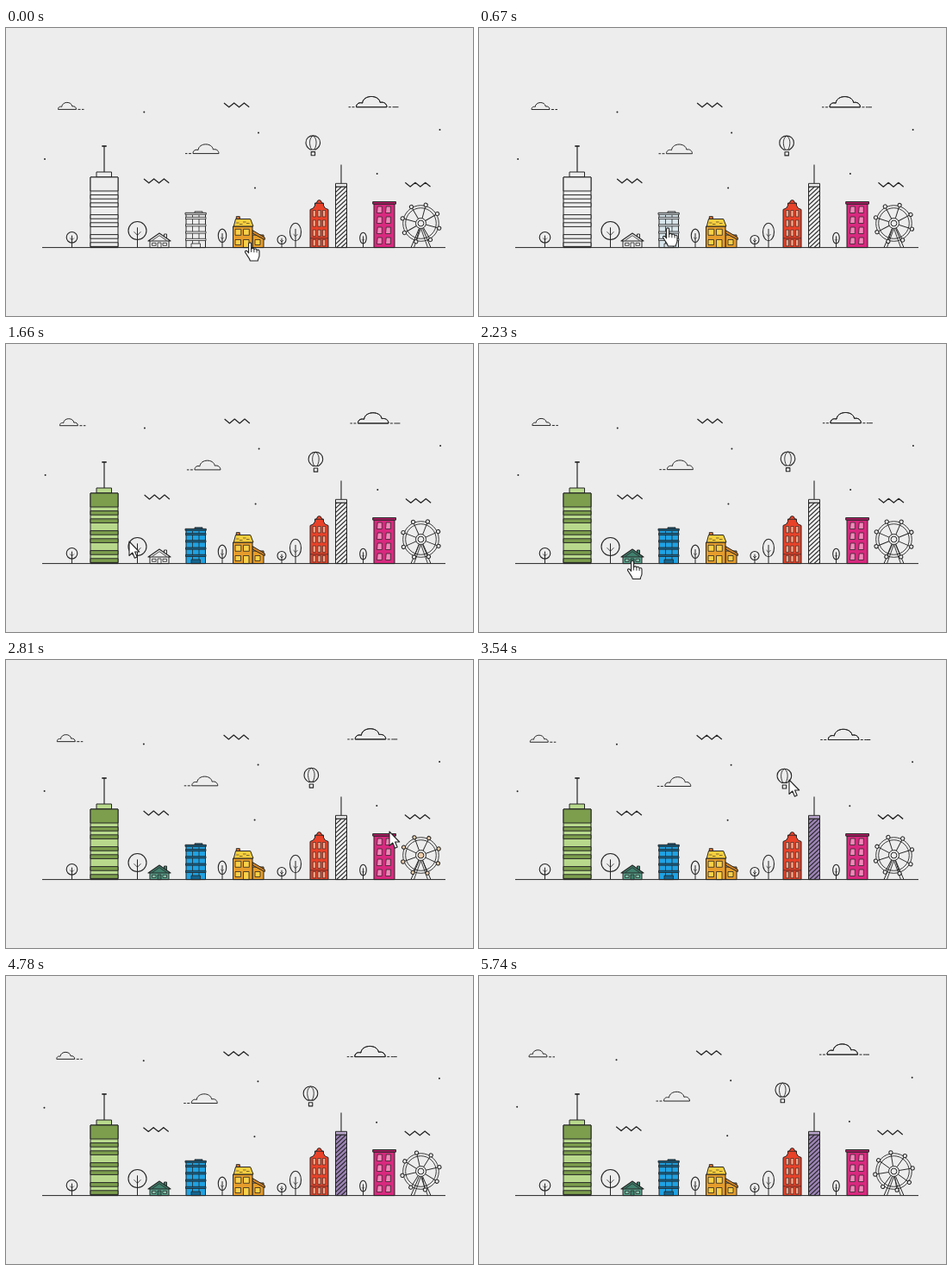
Animation of 542 by 334 pixels, one loop 5840 ms. Source, as an HTML page with a canvas:

```html
<!DOCTYPE html>
<html lang="en">
<head>
<meta charset="utf-8">
<title>City skyline</title>
<style>
html, body { margin: 0; width: 100%; height: 100%; overflow: hidden; background: #ededed; }
canvas { display: block; width: 542px; height: 334px; }
</style>
</head>
<body>
<canvas id="stage"></canvas>
<script>
const W = 542, H = 334, LOOP = 5840, STEP = 140;
const BG = '#ededed', INK = '#252525', GROUND = 254.6;
const TRAVEL = 310, FADE = 290, LAG = 500, EXIT = 4600;
const canvas = document.getElementById('stage');
const ctx = canvas.getContext('2d');
const dpr = window.devicePixelRatio || 1;
canvas.width = W * dpr;
canvas.height = H * dpr;

// Pointer stops: arrival time, x, y. The last one lies past its exit.
const stops = [
  [0, 283, 249.5], [560, 219, 232.5], [1240, 119, 221], [1680, 143, 229], [2000, 178, 252],
  [2620, 482, 226], [2800, 445, 199], [3080, 389, 192], [3500, 360, 139], [4300, 424, 74], [5300, 485, 300]
];

// Hover area (left, right, top), drawing, and when the colour starts to fade in.
const buildings = [
  { area: [98, 130, 173], draw: greenTower, lit: 1200 },
  { area: [166, 190, 238], draw: cottage, lit: 1940 },
  { area: [208, 232, 213], draw: blueBlock, lit: 670 },
  { area: [263, 300, 220], draw: yellowHouse, lit: -FADE },
  { area: [353, 374, 202], draw: redHouse, lit: -FADE },
  { area: [382, 396, 180], draw: purpleTower, lit: 3040 },
  { area: [426, 452, 202], draw: pinkHouse, lit: -FADE },
  { area: [462, 502, 206], draw: wheel, lit: 2480, off: 2680 }
];

const clamp = v => Math.max(0, Math.min(1, v));
const ramp = (t, start, span) => clamp((t - start) / span);
const smooth = p => p * p * (3 - 2 * p);
const mix = (a, b, p) => a + (b - a) * p;

function pointer(t) {
  let [last, x, y] = stops[0];
  for (const [time, sx, sy] of stops.slice(1)) {
    const start = Math.max(last, time - TRAVEL);
    const p = smooth(ramp(t, start, time - start));
    x = mix(x, sx, p);
    y = mix(y, sy, p);
    last = time;
  }
  return [x, y];
}

// The sky shifts against the pointer's recent average position.
function parallax(t) {
  const n = 20;
  let dx = 0, dy = 0;
  for (let i = 0; i < n; i++) {
    const [x, y] = pointer(t - LAG * i / n);
    dx += (283 - x) * .02 / n;
    dy += (250 - y) * .018 / n;
  }
  return [dx, dy];
}

// Fills fade in over the plain background colour.
function paint(path, fill, alpha = 1, width = 1) {
  if (fill) {
    ctx.fillStyle = BG;
    if (alpha < 1) ctx.fill(path);
    ctx.globalAlpha = alpha;
    ctx.fillStyle = fill;
    ctx.fill(path);
    ctx.globalAlpha = 1;
  }
  if (width) {
    ctx.lineWidth = width;
    ctx.stroke(path);
  }
}

const shape = (d, fill, alpha, width) => paint(new Path2D(d), fill, alpha, width);
const line = (x0, y0, x1, y1, width) => shape(`M${x0} ${y0}L${x1} ${y1}`, null, 1, width);

function box(x, y, w, h, fill, alpha, width) {
  const p = new Path2D();
  p.rect(x, y, w, h);
  paint(p, fill, alpha, width);
}

function oval(x, y, rx, ry = rx, fill, alpha, width) {
  const p = new Path2D();
  p.ellipse(x, y, rx, ry, 0, 0, 7);
  paint(p, fill, alpha, width);
}

function at(x, y, draw) {
  ctx.save();
  ctx.translate(x, y);
  draw();
  ctx.restore();
}

function tree(x, y, rx, ry = rx) {
  const s = rx * .38, fork = y + ry * .5;
  oval(x, y, rx, ry, null, 1, 1.1);
  line(x, y - ry * .35, x, GROUND);
  shape(`M${x - s} ${fork - s}L${x} ${fork}L${x + s} ${fork - s}`, null, 1, .8);
}

function greenTower(a) {
  const dark = '#7c9e4d', light = '#b8d98c', band = 4.6;
  line(114, 137, 114, 167, 1.2);
  line(111.3, 137, 116.7, 137, 1.7);
  box(105, 167, 17.5, 6, light, a);
  box(98, 173, 32, GROUND - 173, light, a);
  box(98, 173, 32, 16, dark, a);
  for (let i = 0; i < 6; i++) {
    const y = 189 + band * (1 + 2 * i + (i >> 1));
    box(98, y, 32, band, dark, a);
  }
}

function cottage(a) {
  const roof = '#40806d', glass = '#8bc9b3';
  box(167, 246.5, 22, GROUND - 246.5, '#5ba58e', a);
  box(183.5, 239, 3, 5, roof, a, .9);
  shape('M165 247L178 238L191 247Z', roof, a, 1.1);
  shape('M169.5 246.5L178 240.7L186.5 246.5', null, 1, .8);
  for (const x of [169.5, 182]) box(x, 249.3, 4.5, 3, glass, a, .8);
  box(176, 249, 4, GROUND - 249, roof, a, .8);
}

function blueBlock(a) {
  const slab = '#14658f';
  box(209, 215, 22.5, GROUND - 215, '#1fa2e3', a);
  for (const x of [216.5, 224]) line(x, 217, x, 250, .8);
  for (let i = 0; i < 4; i++) box(208.5, 219.4 + i * 8.3, 23.5, 2.2, slab, a, .8);
  box(219, 212.8, 9, 1.6, slab, a, .8);
  box(208, 214.3, 24.3, 2, slab, a, .9);
  box(215, 250, 10.5, GROUND - 250, slab, a, .8);
}

function yellowHouse() {
  const wall = '#e69d2b', glass = '#fbd04a';
  box(267.3, 218.7, 4, 3, '#e5752c');
  box(286, 240, 13, GROUND - 240, wall);
  shape('M286 234.5L300.3 243V245.5L286 238Z', '#d98725');
  box(263.5, 230, 22.5, GROUND - 230, wall);
  shape('M266.5 221.5H283.7L287 230H264.3Z', '#f8cf3e');
  for (let i = 0; i < 4; i++) line(267 + i * 4, 226 + i % 2 * 2 - i / 2, 270.5 + i * 4, 226 + i % 2 * 2 - i / 2, .6);
  for (const x of [266, 275.5]) {
    box(x, 233.3, 6.8, 7, glass, 1, .8);
    box(x, 245.5, 6.5, x > 270 ? GROUND - 245.5 : 6, glass, 1, .8);
  }
  box(289, 245.5, 6, 6, glass, 1, .8);
}

function redHouse() {
  shape(`M353 ${GROUND}V210.5L356.5 209L358.5 206V203H360.5Q361 199.5 363.5 199.5Q366 199.5 366.5 203H368.5V206L370.5 209L374 210.5V${GROUND}Z`, '#e84229');
  line(359, 203.3, 368, 203.3, .8);
  for (let row = 0; row < 4; row++) {
    for (let col = 0; col < 3; col++) {
      box(356.2 + col * 5.7, 211.5 + row * 11.3, 3.2, 7.4, '#f8a98c', 1, .65);
    }
  }
  line(353, 243.8, 374, 243.8, .7);
}

function purpleTower(a) {
  const body = new Path2D();
  body.rect(382.5, 184, 13, GROUND - 184);
  paint(body, '#9b82b4', a, 0);
  ctx.save();
  ctx.clip(body);
  for (let y = 186; y < 272; y += 5) line(381, y + 1, 397, y - 14, 1.1);
  ctx.restore();
  paint(body);
  line(389, 158.5, 389, 180, 1.1);
  box(382.5, 180.3, 13, 3.7, '#b9a5cb', a);
}

function pinkHouse() {
  box(427, 204, 24, GROUND - 204, '#d8297f');
  box(425.7, 201.5, 26.8, 2.6, '#b81d69');
  for (let y = 207; y < GROUND - 8; y += 12) {
    for (const x of [430.5, 440.5]) {
      shape(`M${x} ${y + 7.5}L${x + .8} ${y}H${x + 5.8}V${y + 7.5}Z`, '#f487b9', 1, .75);
    }
  }
}

function wheel(a, t) {
  const gold = '#f5b97d', r = 22;
  at(481.5, 226.5, () => {
    for (const side of [-1, 1]) {
      line(side * 2, 6, side * 11.5, GROUND - 226.5);
      line(0, 6, side * 8, GROUND - 226.5, .9);
    }
    for (const rim of [20.8, 17.8]) oval(0, 0, rim, rim, null, 1, .9);
    ctx.save();
    ctx.rotate((15 + t * .0036) * Math.PI / 180);
    for (let i = 0; i < 8; i++) {
      line(6, 0, r, 0, .9);
      oval(r, 0, 2.1, 2.1, gold, a);
      ctx.rotate(Math.PI / 4);
    }
    ctx.restore();
    oval(0, 0, 6, 6, BG);
    oval(0, 0, 3.4, 3.4, gold, a);
  });
}

// Two shoulders and a dome on a base line, with two dashes to one side.
function cloud(x, y, w, h, side) {
  const puff = new Path2D('M0 0C0 -.38 .12 -.46 .2 -.38C.23 -1.2 .74 -1.2 .78 -.44C.91 -.52 1 -.3 1 0Z');
  const path = new Path2D();
  path.addPath(puff, new DOMMatrix([w, 0, 0, h, x, y]));
  paint(path);
  const edge = side < 0 ? x : x + w;
  line(edge + side * 2, y, edge + side * 5, y);
  line(edge + side * 6.5, y, edge + side * 9, y);
}

function wave(x, y) {
  let d = `M${x} ${y}`;
  for (let i = 1; i <= 5; i++) d += `L${x + i * 5.85} ${y + i % 2 * 4.8}`;
  shape(d, null, 1, 1.3);
}

function balloon() {
  shape('M353.2 141C350 139 348 136.5 348 133C348 122.2 364.6 122.2 364.6 133C364.6 136.5 362.5 139 359.4 141Z', null, 1, 1.1);
  shape('M354.6 141C351 134 352.4 127 356.3 125C360.2 127 361.6 134 358 141', null, 1, .9);
  box(354.2, 143.6, 4.4, 4.1, null, 1, 1.1);
}

function sky(dx, dy) {
  const layer = (depth, draw) => at(dx * depth, dy * depth, draw);
  layer(.2, () => {
    wave(253, 87);
    wave(160, 175);
    wave(463.3, 179.3);
    for (const [x, y] of [[160.3, 97.5], [45, 152], [293, 121.5], [289, 185.5], [430.7, 169], [503.5, 118]]) {
      oval(x, y, 1, 1, INK, 1, 0);
    }
  });
  layer(.62, () => {
    cloud(60.5, 94.4, 21, 8, 1);
    cloud(217, 145.6, 30, 10.7, -1);
    cloud(406.5, 91.7, 35.5, 12.2, -1);
    cloud(406.5, 91.7, 35.5, 12.2, 1);
    line(451, 91.7, 455.5, 91.7);
  });
  layer(1, balloon);
}

function cursor(x, y) {
  const hand = buildings.some(({ area: [l, r, top] }) => x >= l && x <= r && y >= top && y <= GROUND);
  at(x, y, () => {
    if (hand) {
      shape('M-1.4 .6C-1.4 -1.1 1.6 -1.1 1.6 .6V7C2 5.4 4.8 5.6 4.9 7.3C5.5 6 8 6.4 8.1 8.2C9 7.2 11 7.8 11 9.6V14.5C11 17 9.3 17.8 9.3 20.5H.3C0 17.7 -2.2 16 -3.7 13.3L-5.4 10.6C-6 8.9 -4 8.3 -2.8 9.7L-1.4 11.3Z', '#fff', 1, 1.1);
      shape('M1.6 7V10.5M4.9 7.5V10.8M8.1 8.4V11', null, 1, .9);
    } else {
      shape('M0 0V16.5L3.8 13L6.4 19.2L9.2 18L6.6 12H11.7Z', '#fff', 1, 1.1);
    }
  });
}

function render(t) {
  ctx.setTransform(dpr, 0, 0, dpr, 0, 0);
  ctx.fillStyle = BG;
  ctx.fillRect(0, 0, W, H);
  ctx.strokeStyle = INK;
  ctx.lineJoin = 'round';

  sky(...parallax(t));
  tree(76.5, 242.8, 6.3);
  tree(152.5, 235, 10.5);
  tree(251, 240.8, 4.7, 7.7);
  tree(320, 245.5, 5);
  tree(336, 236.5, 6.5, 10.2);
  tree(414.5, 243.6, 3.8, 6.4);
  for (const { draw, lit, off = LOOP } of buildings) {
    draw(ramp(t, lit, FADE) * (1 - ramp(t, off, FADE)), t);
  }
  line(42, GROUND, 510, GROUND);
  if (t < EXIT) cursor(...pointer(t));
}

// The picture advances in steps, like a screen capture.
function tick(now) {
  const t = now % LOOP;
  render(Math.floor(t / STEP + .3) * STEP);
  requestAnimationFrame(tick);
}

requestAnimationFrame(tick);
</script>
</body>
</html>
```
